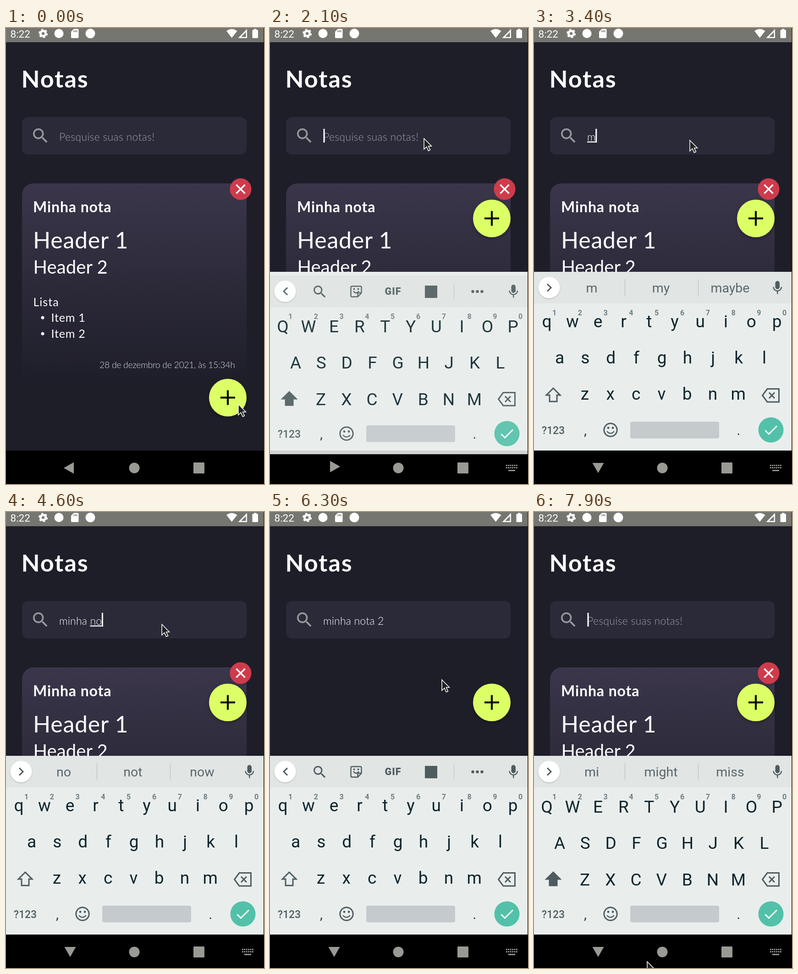
Recreate the animation shown at these times as an HTML page. Size 563 px wide and 995 px high, loop 8000 ms.

```html
<!DOCTYPE html>
<html lang="pt">
<head>
<meta charset="utf-8">
<title>Notas</title>
<style>
  html, body { margin: 0; width: 100%; height: 100%; overflow: hidden; background: #1e1e29; }
  svg { display: block; width: 563px; height: 995px; }
  text { white-space: pre; }
  .app { font-family: Lato, sans-serif; fill: #fff; }
  .light { font-weight: 300; }
  .keys, .status { font-family: Roboto, sans-serif; }
  .mid { text-anchor: middle; }
  .icon { fill: #4e5c60; }
  .line { fill: none; stroke: #4e5c60; stroke-width: 3; }
  .thin { stroke-width: 2.4; }
  .word { text-decoration: underline; text-decoration-thickness: 1px; text-underline-offset: 2px; }
</style>
</head>
<body>
<svg viewBox="0 0 563 995">
  <defs>
    <linearGradient id="fade" x1="0" y1="0" x2="0" y2="1">
      <stop offset="0" stop-color="#3b364b"/>
      <stop offset="1" stop-color="#1e1e29"/>
    </linearGradient>
    <filter id="shadow" x="-30%" y="-30%" width="160%" height="160%">
      <feDropShadow dx="0" dy="3" stdDeviation="4" flood-opacity=".3"/>
    </filter>
    <filter id="soft" x="-30%" y="-30%" width="160%" height="160%">
      <feDropShadow dx="0" dy="1" stdDeviation="1.2" flood-opacity=".3"/>
    </filter>
    <path id="lens" d="M15.5 14h-.79l-.28-.27A6.47 6.47 0 0 0 16 9.5 6.5 6.5 0 1 0 9.5 16c1.61 0 3.09-.59 4.23-1.57l.27.28v.79l5 4.99L20.49 19l-4.99-5zm-6 0C7.01 14 5 11.99 5 9.5S7.01 5 9.5 5 14 7.01 14 9.5 11.99 14 9.5 14z"/>
  </defs>

  <rect width="563" height="995" fill="#1e1e29"/>

  <g class="status" fill="#fff">
    <rect width="563" height="31" fill="#757670"/>
    <text x="9.5" y="20.5" font-size="22.5">8:22</text>
    <circle cx="81" cy="12" r="5.6" fill="none" stroke="#fff" stroke-width="5"/>
    <circle cx="81" cy="12" r="8.6" fill="none" stroke="#fff" stroke-width="3" stroke-dasharray="4.5 4.5"/>
    <circle cx="115.5" cy="12" r="10"/>
    <path d="M148 2h8.5q2 0 2 2v16q0 2-2 2h-12.5q-2 0-2-2V8z"/>
    <path d="M148.5 5v4M151.5 5v4M154.5 5v4" stroke="#757670" stroke-width="1.6"/>
    <circle cx="184" cy="12" r="10.5"/>
    <path d="M481 6.5Q492.5-2 504.5 6.5L492.7 21.5z"/>
    <path d="M526 2v20h-19.5z"/>
    <path d="M523.5 9v10.500h-10.500z" fill="#757670"/>
    <path d="M541 2h5.5v2h2q1.5 0 1.5 1.5v15q0 1.5-1.5 1.5h-9.5q-1.5 0-1.5-1.5v-15q0-1.5 1.5-1.5h2z"/>
  </g>

  <g class="app">
    <text x="33.5" y="130" font-size="52" font-weight="700" letter-spacing="2">Notas</text>
    <rect x="35" y="194.5" width="490" height="81.5" rx="13" fill="#2b2a39"/>
    <use href="#lens" transform="translate(53.6 213.6) scale(1.8)" fill="#9a9a9b"/>
    <text id="hint" class="light" x="116" y="245.5" font-size="23" letter-spacing=".3" fill="#a0a0a5">Pesquise suas notas!</text>
    <text id="query" class="light" x="116" y="245.5" font-size="23" letter-spacing=".2"><tspan id="done"></tspan><tspan id="word" class="word"></tspan></text>
    <rect id="caret" y="220" width="3" height="30"/>

    <g id="card">
      <path d="M35 770V364a25 25 0 0 1 25-25h440a25 25 0 0 1 25 25v406z" fill="url(#fade)"/>
      <text x="59" y="402" font-size="32" font-weight="700" letter-spacing=".9">Minha nota</text>
      <text x="59" y="481" font-size="50" letter-spacing=".8">Header 1</text>
      <text x="59.5" y="536" font-size="40" letter-spacing=".1">Header 2</text>
      <g font-size="25" letter-spacing=".8">
        <text x="59.5" y="606.5" letter-spacing="1">Lista</text>
        <text x="98.5" y="641">Item 1</text>
        <text x="98.5" y="676">Item 2</text>
      </g>
      <circle cx="80" cy="632" r="3.5"/>
      <circle cx="80" cy="667" r="3.5"/>
      <text class="light" x="499.5" y="742" font-size="19.5" letter-spacing="-.36" text-anchor="end" fill="#dddde2">28 de dezembro de 2021, às 15:34h</text>
      <circle cx="512" cy="351.5" r="23.5" fill="#d03b4b"/>
      <path d="M502.5 342l19 19m0-19l-19 19" stroke="#fff" stroke-width="3.5"/>
    </g>
  </g>

  <g id="fab">
    <circle r="41" fill="#dcff65" filter="url(#shadow)"/>
    <path d="M-16 0h32M0-16v32" stroke="#000" stroke-width="4.2"/>
  </g>

  <rect y="922" width="563" height="73" fill="#000"/>

  <g id="board" class="keys">
    <rect y="532" width="562" height="390" fill="#e9eeed"/>
    <rect id="foot" y="922" width="562" height="8" fill="#cfd3d3"/>
    <g id="slide">
      <rect y="532" width="562" height="69" fill="#e1e5e4"/>
      <circle cx="33" cy="566.5" r="23.5" fill="#fff" filter="url(#soft)"/>
      <path id="chevron" class="line"/>
      <g id="tools" class="icon">
        <use href="#lens" transform="translate(90.5 549.5) scale(1.5)"/>
        <path class="line thin" d="M179 555.5h18q2.5 0 2.5 2.5v12l-8 8.5h-12.5q-2.5 0-2.5-2.5v-18q0-2.5 2.5-2.5z"/>
        <path class="line thin" d="M191.5 578v-8h8M182 566q6 8 12 0"/>
        <circle cx="183.5" cy="561.5" r="2"/>
        <circle cx="192.5" cy="561.5" r="2"/>
        <text class="mid" x="268.5" y="574" font-size="21.5" font-weight="900" letter-spacing="1">GIF</text>
        <rect x="338" y="554" width="27" height="27"/>
        <path d="M401.5 549v35" stroke="#c6caca" stroke-width="1.5"/>
        <circle cx="442.5" cy="567" r="3.2"/>
        <circle cx="452.5" cy="567" r="3.2"/>
        <circle cx="462.5" cy="567" r="3.2"/>
      </g>
      <g id="offers" class="mid" font-size="28.5" fill="#59676b">
        <path d="M198.5 548v37M358.5 548v37" stroke="#c3c8c8" stroke-width="1.5"/>
      </g>
      <rect class="icon" x="526.5" y="552" width="9.5" height="18" rx="4.75"/>
      <path class="line thin" d="M522.5 565a8.75 8.75 0 0 0 17.5 0M531.25 574v6.5"/>
      <g id="letters" class="mid" font-size="37" fill="#0d242b"></g>
      <g id="digits" class="mid" font-size="16" font-weight="600" fill="#707e82"></g>
      <path id="shift" class="line" d="M42 786L57 801H50V815H34V801H27Z"/>
      <path class="line" d="M509 787.5h25.5v28.5H509l-10.5-14.25z"/>
      <path class="line" d="M513 795.5l12 12.5m0-12.5l-12 12.5"/>
      <text class="mid icon" x="42" y="885.5" font-size="23" font-weight="500">?123</text>
      <text class="mid" x="112" y="888" font-size="30" fill="#24393f">,</text>
      <text class="mid" x="446.5" y="888" font-size="30" fill="#24393f">.</text>
      <circle class="line" cx="167" cy="877" r="14.2"/>
      <path class="line thin" d="M159 880q8 9 16 0"/>
      <circle class="icon" cx="162" cy="872.5" r="2.4"/>
      <circle class="icon" cx="172" cy="872.5" r="2.4"/>
      <rect x="210" y="859" width="194" height="36.5" rx="4" fill="#c5cacd"/>
      <circle cx="517" cy="877" r="27.5" fill="#53c1a9"/>
      <path d="M504.5 878l8 8 17.5-17.5" fill="none" stroke="#fff" stroke-width="3"/>
    </g>
  </g>

  <g fill="#999a94">
    <path id="back" d="M126 960l22-12.5v25z"/>
    <circle cx="280" cy="960" r="11.5"/>
    <rect x="409" y="948" width="24" height="24" rx="1.5"/>
    <g id="dots" fill="none" stroke="#999a94" stroke-width="2.8">
      <path d="M515 954.5h25M515 959.5h25" stroke-dasharray="2.8 1.6"/>
      <path d="M520 965.5h15"/>
    </g>
  </g>

  <path d="M562.5 0v995" stroke="#000" opacity=".7"/>
  <path id="mouse" d="M0 0V23.5L5.6 18.2L9.6 27L13.5 25.2L9.6 16.7H16.5Z" fill="#222" stroke="#fff" stroke-width="1.5"/>
</svg>

<script>
const $ = id => document.getElementById(id);
const show = (id, on) => $(id).style.display = on ? '' : 'none';
// Value of the last step that has begun
const at = (steps, t) => steps.findLast(s => s[0] <= t)[1];

function addText(parent, x, y, str) {
  const el = document.createElementNS('http://www.w3.org/2000/svg', 'text');
  el.setAttribute('x', x);
  el.setAttribute('y', y);
  el.textContent = str;
  $(parent).append(el);
  return el;
}

const PITCH = 55.8, LOOP = 8000;
const keys = [['QWERTYUIOP', 28], ['ASDFGHJKL', 56], ['ZXCVBNM', 111]].flatMap(([row, x], r) =>
  [...row].map((key, i) => ({ key, y: 656 + r * 79.3, el: addText('letters', x + i * PITCH, 0, key) })));
[...'1234567890'].forEach((d, i) => addText('digits', 44.5 + i * PITCH, 627, d));
const offers = [126, 277, 428].map(x => addText('offers', x, 577, ''));

const queries = [
  [0, ''], [3300, 'm'], [3700, 'mi'], [3800, 'min'], [3900, 'minh'], [4000, 'minha '],
  [4300, 'minha n'], [4600, 'minha no'], [4700, 'minha not'], [4800, 'minha nota'],
  [5300, 'minha nota '], [5600, 'minha nota 2'], [6400, 'minha nota '], [6600, 'minha nota'],
  [7100, 'minha no'], [7200, 'minha'], [7300, 'mi'], [7400, '']
];
const strips = [
  [0, ''], [3400, 'm my maybe'], [3700, 'mi might miss'], [3800, 'min mind mine'],
  [3900, 'minh mint mine'], [4000, 'is and the'], [4300, 'n no not'], [4600, 'no not now'],
  [4700, 'not nothing note'], [4800, 'nota note not'], [5300, 'is and the'], [5600, ''],
  [6400, 'nota note not'], [7100, 'no not now'], [7200, 'minha mind mine'], [7300, 'mi might miss']
];
const mouse = [
  [0, [507, 821]], [100, [487, 819]], [400, [491, 817]], [800, [487, 813]],
  [1000, [492, 765]], [1100, [497, 620]], [1200, [450, 440]], [1300, [386, 306]],
  [1500, [336, 241]], [2300, [340, 245]], [5900, [395, 299]], [6100, [388, 335]],
  [6200, [375, 366]], [7700, [390, 369]], [7900, [247, 981]]
];
const caret = [[0, 0], [2100, 1], [2500, 0], [2800, 1], [3100, 0], [3300, 1], [6200, 0], [6400, 1]];
const drop = [[0, 8], [2200, 2], [2300, 0]];
const turn = [[0, 0], [2100, 180], [2200, 240], [2300, 270]];

function draw(t) {
  const query = at(queries, t), strip = at(strips, t);
  const open = t >= 2100, caps = t < 3400 || t >= 7400;

  const word = query.match(/[a-z]*$/)[0];
  $('word').textContent = word;
  $('done').textContent = query.slice(0, query.length - word.length);
  show('hint', !query);
  show('caret', at(caret, t));
  $('caret').setAttribute('x', 116.5 + (query ? $('query').getComputedTextLength() - 1 : 0));
  show('card', !query.endsWith('2'));
  $('fab').setAttribute('transform', `translate(484 ${open ? 415.5 : 806.5})`);

  const dy = at(drop, t);
  show('board', open);
  show('dots', open);
  $('foot').setAttribute('height', dy);
  $('slide').setAttribute('transform', `translate(0 ${dy})`);
  $('slide').setAttribute('opacity', 1 - dy / 80);
  $('back').setAttribute('transform', `translate(${dy && open ? 2 : 0} 0) rotate(${at(turn, t)} 138.5 958.5)`);

  show('tools', !strip);
  show('offers', strip);
  strip.split(' ').forEach((s, i) => offers[i].textContent = s);
  $('chevron').setAttribute('d', strip ? 'M29 558.5l8 8-8 8' : 'M38 558.5l-8 8 8 8');
  $('shift').style.fill = caps ? '#4e5c60' : 'none';
  for (const { key, y, el } of keys) {
    el.textContent = caps ? key : key.toLowerCase();
    el.setAttribute('y', caps ? y : y - 3.5);
  }
  $('mouse').setAttribute('transform', `translate(${at(mouse, t)})`);
}

function tick() {
  draw(performance.now() % LOOP);
  requestAnimationFrame(tick);
}
tick();
</script>
</body>
</html>
```
